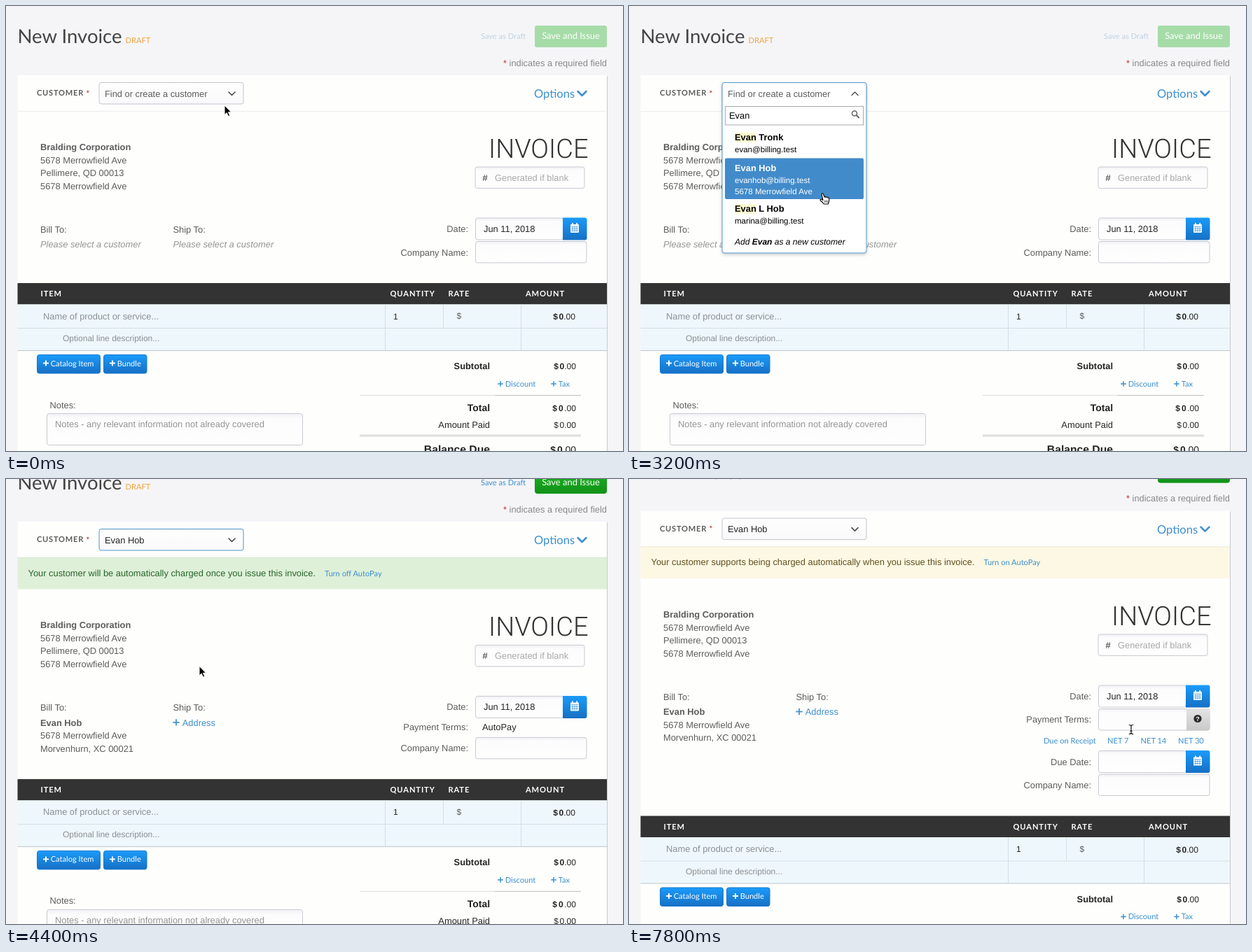
Recreate the animation shown at these times as an HTML page. Size 881 by 636 pixels, loop 8000 ms.

```html
<!DOCTYPE html>
<html lang="en">
<head>
<meta charset="utf-8">
<title>New Invoice</title>
<style>
  html, body { margin: 0; width: 100%; height: 100%; overflow: hidden; background: #f5f5f8; }
  svg { display: block; width: 881px; height: 636px; }
  text { font: 12.86px "Liberation Sans", Arial, sans-serif; fill: #5c5c5c; text-rendering: geometricPrecision; white-space: pre; }
  .lato { font-family: Lato, sans-serif; font-size: 11.1px; }
  .caps { font-weight: bold; letter-spacing: .75px; }
  .column { letter-spacing: .9px; }
  .title { font-size: 27.5px; fill: #444; }
  .options { font-size: 16.5px; }
  .save { font-size: 12.95px; }
  .heading { font: 300 38px Roboto, sans-serif; fill: #333; }
  .bold { font-weight: bold; }
  .italic { font-style: italic; }
  .end { text-anchor: end; }
  .mid { text-anchor: middle; }
  .small { font-size: 12.02px; }
  .tiny { font-size: 11.56px; }
  .total { font-size: 13.9px; }
  .due { font-size: 15.7px; }
  .dark { fill: #242424; }
  .black { fill: #000; }
  .hint { fill: #949494; }
  .pale { fill: #a8a8a8; }
  .white { fill: #fff; }
  .blue { fill: #3c8fcf; }
  .red { fill: #b8322f; }
  .orange { fill: #f0a33e; }
  .green { fill: #25642b; }
  .brown { fill: #615020; }
  .line { fill: none; stroke-linecap: round; stroke-linejoin: round; }
</style>
</head>
<body>
<svg id="stage" viewBox="0 0 881 636" xmlns="http://www.w3.org/2000/svg"></svg>
<script>
const LOOP = 8000, STEP = 200;
const FIRST = 'Evan', CUSTOMER = 'Evan Hob', STREET = '5678 Merrowfield Ave';

// Drawing helpers
const text = (x, y, str, cls = '') => `<text x="${x}" y="${y}" class="${cls}">${str}</text>`;
const rect = (x, y, w, h, fill, extra = '') =>
  `<rect x="${x}" y="${y}" width="${w}" height="${h}" fill="${fill}" ${extra}/>`;
const path = (d, color, width = 1) =>
  `<path class="line" d="${d}" stroke="${color}" stroke-width="${width}"/>`;
const rule = (x1, y1, x2, y2, color, width = 1) =>
  `<path d="M${x1} ${y1}L${x2} ${y2}" stroke="${color}" stroke-width="${width}"/>`;
const group = (id, body) => `<g id="${id}">${body}</g>`;
const gradient = (id, ...stops) => `<linearGradient id="${id}" x2="0" y2="1">${
  stops.map(([at, color]) => `<stop offset="${at}" stop-color="${color}"/>`).join('')}</linearGradient>`;
const field = (x, y, w, h) => rect(x, y, w, h, 'url(#field)', 'stroke="#c9c9d1" rx="3"');
const plus = (x, y, color, r = 4, width = 1.7) =>
  rule(x - r, y, x + r, y, color, width) + rule(x, y - r, x, y + r, color, width);
const lines = (x, y, rows) => rows.map((row, i) => text(x, y + i * 18.5, row, i ? '' : 'bold')).join('');
const link = (x, y, str) => text(x, y, str, 'lato blue');
const plusLink = (x, y, str) => plus(x, y - 3.7, '#3c8fcf', 3.8, 1.5) + link(x + 6.7, y, str);

function money(end, y, cls, size, whole = 'bold') {
  const zero = end - size * 1.39 - size * .556;
  return text(zero - size * .7, y, '$', `${cls} dark ${whole}`) +
    text(zero, y, '0', `${cls} dark ${whole}`) + text(end, y, '.00', `${cls} dark end`);
}

function blueButton(x, w, label) {
  return rect(x + .5, 498.5, w - 1, 26.5, 'url(#blue)', 'rx="3" stroke="#1878cd"') +
    plus(x + 13, 510.5, '#fff', 4, 1.9) + text(x + 19.7, 514.5, label, 'lato white');
}

function dateField(y, value = '') {
  let icon = rect(806, y + 9, 12, 12, '#fff', 'rx="1"') + rect(808, y + 7, 1.8, 3, '#fff') + rect(814.3, y + 7, 1.8, 3, '#fff');
  for (let i = 0; i < 3; i++) icon += rule(806.8, y + 12.2 + i * 2.9, 817.2, y + 12.2 + i * 2.9, '#1c83dc', .6);
  for (let i = 1; i < 4; i++) icon += rule(806 + i * 3, y + 12.2, 806 + i * 3, y + 20, '#1c83dc', .6);
  return field(670.5, y, 125, 31) + text(682, y + 20, value, 'dark') +
    `<path d="M795 ${y - .5}h31.5a3 3 0 0 1 3 3v26a3 3 0 0 1 -3 3h-31.5z" fill="url(#blue)"/>` + icon;
}

const defs = `<defs>
  ${gradient('field', [0, '#f1f1f6'], [.16, '#fcfcfd'], [1, '#fefefe'])}
  ${gradient('select', [0, '#fefefe'], [1, '#f9f9fb'])}
  ${gradient('blue', [0, '#1b9bfb'], [1, '#1670c4'])}
  ${gradient('green', [0, '#1bb11f'], [1, '#119218'])}
  ${gradient('gray', [0, '#e4e4e4'], [1, '#c9c9c9'])}
  <filter id="shadow" x="-5%" y="-5%" width="110%" height="112%">
    <feDropShadow dx="0" dy="2" stdDeviation="2" flood-opacity=".2"/></filter></defs>`;

const head =
  text(16.5, 53, 'New Invoice', 'lato title') + text(170.5, 53, 'DRAFT', 'lato orange') +
  group('saveOff', text(742, 46.7, 'Save as Draft', 'lato end" style="fill:#bfd3e3') +
    rect(755, 28, 103, 31, '#a6dca8', 'rx="3"')) +
  group('saveOn', text(742, 46.7, 'Save as Draft', 'lato blue end') +
    rect(755.5, 28.5, 102, 30, 'url(#green)', 'rx="3" stroke="#129619"')) +
  text(806.5, 47.3, 'Save and Issue', 'lato save white mid') +
  text(858, 85.7, '<tspan class="red">*</tspan> indicates a required field', 'end" style="fill:#888') +
  rect(17.5, 100, 841.5, 900, '#c9c9cf') + rect(16.5, 99, 841.5, 900, '#fefefd') +
  rule(16.5, 150.5, 858, 150.5, '#ececee') +
  text(44, 128, 'CUSTOMER', 'lato caps') + text(114.5, 128.5, '*', 'lato bold red') +
  `<rect id="selectBox" x="133" y="109.5" width="206" height="30.5" rx="3" fill="url(#select)"/>` +
  group('placeholder', text(141, 129.8, 'Find or create a customer')) +
  group('chosen', text(141, 129.8, CUSTOMER, 'dark')) +
  path('M318 123L322.5 127.5L327 123', '#4a4a4a', 1.6) +
  text(754, 131, 'Options', 'lato options blue') + path('M816.5 122L822.5 128L828.5 122', '#3c8fcf', 2.5);

const banner = (id, fill, edge, cls, message, x, action) => group(id,
  rect(16.5, 150, 841.5, 45.5, fill) + rule(16.5, 150.5, 858, 150.5, edge) +
  text(31.5, 176.9, message, cls) + link(x, 176.9, action));

const body =
  lines(49, 206, ['Bralding Corporation', STREET, 'Pellimere, QD 00013', STREET]) +
  text(831.5, 217, 'INVOICE', 'heading end') +
  field(670, 230, 156, 30.5) + text(680.5, 249.6, '#', 'dark') + text(698, 249.6, 'Generated if blank', 'pale') +
  text(49, 324, 'Bill To:') + text(238.5, 324, 'Ship To:') +
  group('noCustomer', [49, 238.5].map(x => text(x, 345, 'Please select a customer', 'italic hint')).join('')) +
  group('billing', lines(49, 345.2, [CUSTOMER, STREET, 'Morvenhurn, XC 00021']) +
    plus(243, 340.5, '#3c8fcf', 4.7, 1.7) + text(251.8, 345.2, 'Address', 'blue')) +
  text(660, 323, 'Date:', 'end') + dateField(303, 'Jun 11, 2018') +
  group('autoTerms', text(660, 351.6, 'Payment Terms:', 'end') + text(680, 351.6, 'AutoPay', 'dark')) +
  group('manualTerms', text(660, 356, 'Payment Terms:', 'end') + field(670.5, 336.5, 158.5, 30.5) +
    `<path d="M796 336h30.5a3 3 0 0 1 3 3v25.5a3 3 0 0 1 -3 3h-30.5z" fill="url(#gray)"/>` +
    `<circle cx="812" cy="350.5" r="5.6" fill="#2a2a2a"/>` + text(812, 353.8, '?', 'bold white mid" style="font-size:9px') +
    link(592, 385.5, 'Due on Receipt') + link(683, 385.5, 'NET 7') + link(730.5, 385.5, 'NET 14') + link(784, 385.5, 'NET 30') +
    text(660, 417, 'Due Date:', 'end') + dateField(396.5));

const columns = [[49.5, 'ITEM'], [548.5, 'QUANTITY'], [631.5, 'RATE'], [742, 'AMOUNT']];
const lower =
  text(660, 356.5, 'Company Name:', 'end') + field(670.5, 336.5, 158.5, 30.5) +
  rect(16.5, 396, 841.5, 30.5, '#333') + columns.map(([x, name]) => text(x, 415, name, 'lato caps column white')).join('') +
  rect(16.5, 426.5, 841.5, 66, '#eef7fc') +
  rule(16.5, 460.5, 858, 460.5, '#d3dfe6') + rule(16.5, 492.5, 858, 492.5, '#bcc8cf') +
  rule(541.5, 426.5, 541.5, 492, '#d3dfe6') + rule(624.5, 426.5, 624.5, 460, '#d3dfe6') + rule(735.5, 426.5, 735.5, 492, '#d3dfe6') +
  text(53, 447.5, 'Name of product or service...', 'hint" style="fill:#8b9093') +
  text(81, 479, 'Optional line description...', 'small" style="fill:#8b9093') +
  text(553, 447.5, '1', 'small dark') + text(643.5, 447.3, '$', 'small') + money(813, 448, 'small', 12.02) +
  blueButton(44, 91, 'Catalog Item') + blueButton(139, 62.5, 'Bundle') +
  text(691, 519, 'Subtotal', 'bold dark end') + money(814, 519, 'small', 12.02) +
  plusLink(706, 543.7, 'Discount') + plusLink(782, 543.7, 'Tax') +
  rule(505, 556.5, 698, 556.5, '#dcdcdc') + rule(698, 556.5, 821, 556.5, '#bdbdbd') +
  text(691, 579.3, 'Total', 'bold dark total end') + money(814, 579.3, 'small', 12.8) +
  text(691, 603, 'Amount Paid', 'dark end') + money(814, 603, 'small', 12.02, '') +
  rule(505, 614, 821, 614, '#dedede', 3) +
  text(691, 638.5, 'Balance Due', 'bold dark due end') + money(814, 638.5, 'total', 13.9) +
  text(62.5, 574.5, 'Notes:') + field(58.5, 582.5, 365, 45) +
  text(70, 602, 'Notes - any relevant information not already covered', 'hint');

const results = [
  { y: 174, h: 43.5, rest: ' Tronk', info: ['evan@billing.test'] },
  { y: 217.5, h: 58.5, rest: ' Hob', info: ['evanhob@billing.test', STREET] },
  { y: 276, h: 43.5, rest: ' L Hob', info: ['marina@billing.test'] },
];
const result = ({ y, h, rest, info }, active) => {
  const ink = active ? 'white' : 'black';
  return rect(active ? 137 : 151, active ? y : y + 7, active ? 198 : 30, active ? h : 14,
      active ? '#428bca' : '#fffbd2', active ? 'rx="2"' : '') +
    text(151, y + 18.3, FIRST + rest, `bold ${ink}`) +
    info.map((row, i) => text(151, y + 35 + i * 16, row, `tiny ${ink}`)).join('');
};

const menu =
  `<rect id="panel" x="133" y="109.5" width="206" rx="3" fill="#fff" stroke="#4f96c8" filter="url(#shadow)"/>` +
  text(141, 129.8, 'Find or create a customer') + path('M318 127.5L322.5 123L327 127.5', '#4a4a4a', 1.4) +
  rect(137.5, 143.5, 197, 26.5, '#fff', 'stroke="#aaa"') +
  `<circle cx="322" cy="153.5" r="3.5" fill="none" stroke="#666" stroke-width="1.6"/>` +
  path('M324.8 156.3L328 159.5', '#666', 2) +
  `<text id="query" class="black" x="143" y="161"></text>` + rect(0, 149.5, 1, 14, '#000', 'id="caret"') +
  group('searching', text(236.5, 191, 'Searching…', 'tiny italic mid" style="fill:#888')) +
  group('found', results.map((r, i) =>
      group(`plain${i}`, result(r, false)) + group(`active${i}`, result(r, true))).join('') +
    text(151, 341, `Add <tspan class="bold">${FIRST}</tspan> as a new customer`, 'small italic black'));

// Pointers are drawn with their hot spot at 0,0
const pointers =
  group('arrow', '<path d="M0 0V13.5L3.2 10.6L5.4 15.6L7.7 14.6L5.5 9.8H9.6Z" fill="#000" stroke="#fff"/>') +
  group('hand', `<path d="M-1 1.3Q0 -.6 1.4 1L3 5.5Q4.4 4.6 5.2 5.9Q6.6 5 7.5 6.4Q9.4 5.8 9.7 8L9.6 11.5L8.3 15.5H2.2
    Q0 12.5 -2.8 10.5Q-3.6 8.4 -1.3 8.8L1 10Z" fill="#fff" stroke="#000" stroke-width="1.1" stroke-linejoin="round"/>` +
    path('M3.6 10.5V13M5.6 10.5V13M7.4 10.5V13', '#000', .7)) +
  group('beam', ['#fff', '#111'].map((color, i) =>
    path('M-2.7 -6.5Q0 -6.5 0 -4.5Q0 -6.5 2.7 -6.5M0 -5V5M-2.7 6.5Q0 6.5 0 4.5Q0 6.5 2.7 6.5M-1.4 2H1.4', color, i ? 1.2 : 2.6)).join(''));

const stage = document.getElementById('stage');
stage.innerHTML = defs + group('page',
  head +
  banner('autoOn', '#dff0d8', '#d3e6c8', 'green', 'Your customer will be automatically charged once you issue this invoice.', 455, 'Turn off AutoPay') +
  banner('autoOff', '#fcf8e3', '#f4ecd0', 'brown', 'Your customer supports being charged automatically when you issue this invoice.', 506.5, 'Turn on AutoPay') +
  group('body', body) + group('lower', lower) + group('menu', menu)) + group('pointer', pointers);

// Motion: [time, value...]
const scrollKeys = [[3800, 0], [4000, 8], [4200, 20.4], [4400, 38], [4600, 50], [4800, 53.4]];
const pointerKeys = [
  [0, 312, 142], [200, 308, 136], [400, 300, 128], [2400, 300, 150], [2600, 296, 182], [2800, 288, 228],
  [3000, 279, 258], [3200, 276, 267.5], [4800, 276, 267.5], [5000, 400, 300], [5200, 590, 330], [5400, 672, 322],
  [5600, 664, 295], [5800, 590, 190], [6000, 513, 120], [6600, 512, 120], [6800, 560, 185],
  [7000, 640, 285], [7200, 695, 345], [7400, 717, 358]];
const shapeKeys = [[0, 'arrow'], [400, 'hand'], [800, ''], [2400, 'arrow'], [2600, 'hand'], [3600, 'arrow'],
  [5400, 'beam'], [5800, 'arrow'], [6000, 'hand'], [6800, 'arrow'], [7200, 'beam']];

const held = (keys, t) => keys.filter(k => k[0] <= t).pop()[1];
function tween(keys, t) {
  const next = keys.findIndex(k => k[0] > t);
  if (next < 0) return keys[keys.length - 1].slice(1);
  if (next === 0) return keys[0].slice(1);
  const a = keys[next - 1], b = keys[next], p = (t - a[0]) / (b[0] - a[0]);
  return a.slice(1).map((v, i) => v + (b[i + 1] - v) * p);
}

const el = id => document.getElementById(id);
const show = (id, on) => { el(id).style.display = on ? '' : 'none'; };
const move = (id, x, y) => el(id).setAttribute('transform', `translate(${x} ${y})`);

function render(t) {
  const open = t >= 600 && t < 3600, found = t >= 2200, picked = t >= 3600, manual = t >= 6200;
  const typed = FIRST.slice(0, Math.max(0, Math.floor((t - 800) / STEP)));

  move('page', 0, -tween(scrollKeys, t)[0]);
  move('body', 0, picked ? 45.4 : 0);
  move('lower', 0, manual ? 138.9 : picked ? 70.9 : 0);
  for (const id of ['saveOn', 'chosen', 'billing']) show(id, picked);
  for (const id of ['saveOff', 'placeholder', 'noCustomer']) show(id, !picked);
  for (const id of ['autoOn', 'autoTerms']) show(id, picked && !manual);
  for (const id of ['autoOff', 'manualTerms']) show(id, manual);
  el('selectBox').setAttribute('stroke', picked && !manual ? '#4f96c8' : '#c4c4cd');

  show('menu', open);
  el('panel').setAttribute('height', found ? 243.5 : 93.5);
  show('searching', !found);
  show('found', found);
  const active = t < 2800 ? 0 : 1;
  results.forEach((_, i) => { show(`plain${i}`, i !== active); show(`active${i}`, i === active); });
  el('query').textContent = typed;
  if (open) el('caret').setAttribute('x', 143 + el('query').getComputedTextLength());
  show('caret', t < 1800 || t % 900 < 450);

  const shape = held(shapeKeys, t);
  for (const id of ['arrow', 'hand', 'beam']) show(id, id === shape);
  move('pointer', ...tween(pointerKeys, t));
}

const start = performance.now();
let last = -1;
function tick() {
  const t = Math.floor(((performance.now() - start) % LOOP) / STEP) * STEP;
  if (t !== last) render(last = t);
  requestAnimationFrame(tick);
}
tick();
</script>
</body>
</html>
```
